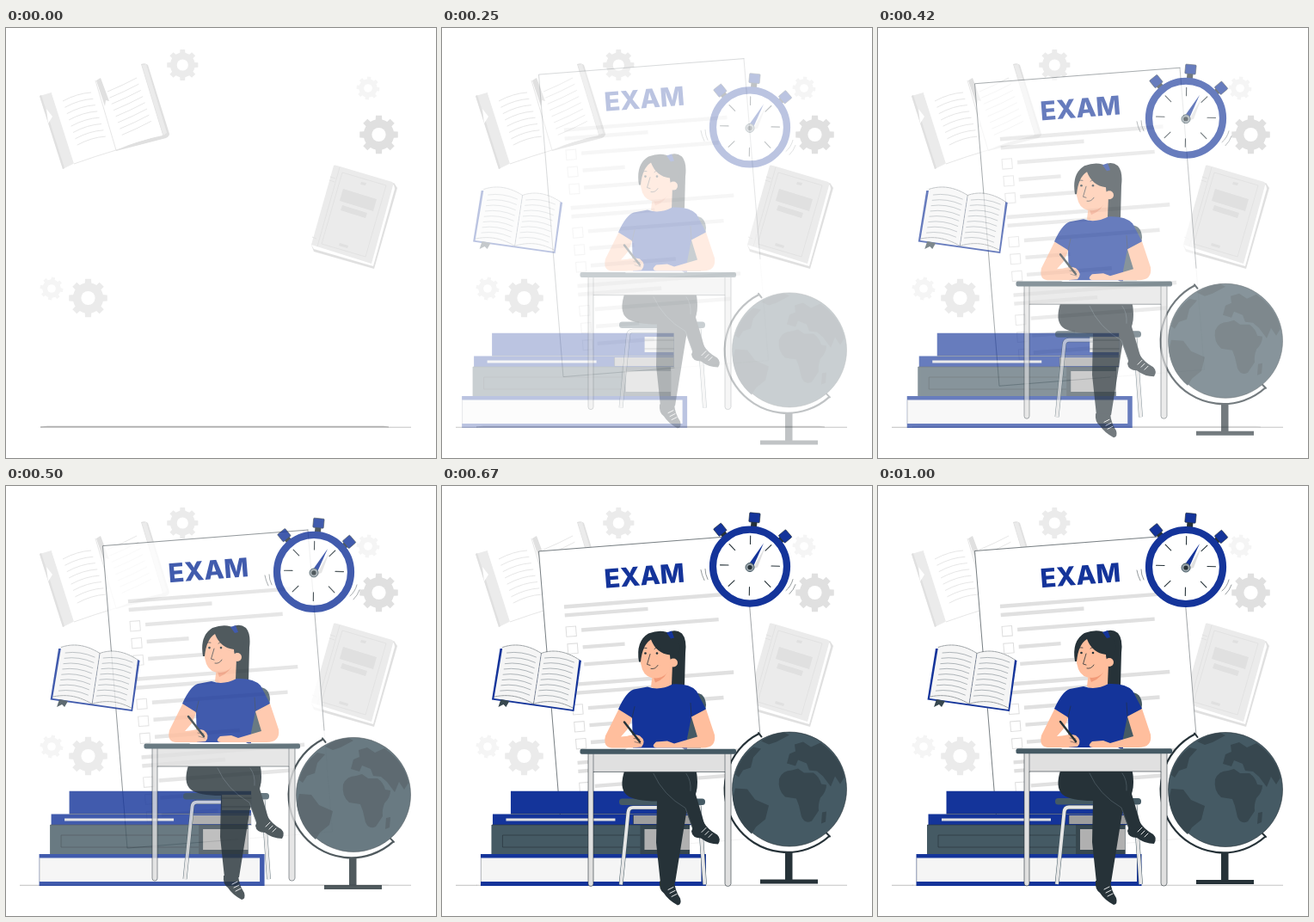
These frames come from a looping animation (500x500 px, 1.04 s). An HTML page:

```html
<!DOCTYPE html>
<html lang="en">
<head>
<meta charset="utf-8">
<title>Exam</title>
<style>
html, body { margin: 0; width: 100%; height: 100%; overflow: hidden; background: #fff; }
svg { display: block; width: 100vw; height: 100vh; }
.blue { fill: #14349a; }
.dark { fill: #263238; }
.slate { fill: #455a64; }
.deep { fill: #37474f; }
.g1 { fill: #f5f5f5; }
.g2 { fill: #ebebeb; }
.g3 { fill: #e0e0e0; }
.skin { fill: #ffbe9d; }
.white { fill: #fff; }
.line { fill: none; stroke: #263238; stroke-width: .8; stroke-linecap: round; }
.edge { stroke: #263238; stroke-width: .6; }
.faint { fill: none; stroke: #e0e0e0; stroke-width: .8; }
</style>
</head>
<body>
<svg viewBox="0 0 500 500">
  <g id="gears"></g>

  <g id="backBook">
    <path class="g2" d="M39 79L53 75L80 157L66 164Z"/>
    <path class="g3" d="M39 79L41 78L68 163L66 164Z"/>
    <path class="white" d="M47 94L54 103L49 111Z"/>
    <path class="g3" d="M157 42Q162 40 165 43L190 123Q190 126 186 128L128 143L127 140L182 124Z"/>
    <path class="g2" d="M158 43L163 42L187 122L183 125Z"/>
    <path class="white" d="M53 76Q80 58 104 61Q128 42 156 43L182 125Q155 130 128 142Q104 148 79 158Z"/>
    <path class="faint" d="M104 61L128 142M79 158Q104 149 128 142L186 127"/>
    <path class="g3" d="M105 61L110 58L120 85L116 84L115 91Z"/>
    <path id="backLines" class="faint"/>
  </g>

  <g id="closedBook">
    <path class="g3" d="M451 180L455 186L428 280L358 260L355 252Z"/>
    <path class="white" d="M355 252L451 182L452 187L427 277L358 257Z"/>
    <path class="g2" d="M381 160Q382 159 385 160L449 179Q451 180 450 183L425 274L355 252Z"/>
    <path class="faint" d="M388 162L362 254M391 168L442 183L418 266L367 251ZM377 173L383 175M376 177L382 179M356 243L361 245"/>
    <path class="g3" d="M392 187L431 199L427 213L388 201ZM391 206L420 215L418 221L389 212ZM413 179L419 180L418 183L412 182ZM388 250L398 253L397 256L387 253Z"/>
  </g>

  <path d="M40 464.3H471" stroke="#c4c4c4" stroke-width="1.1"/>
  <path id="groundTip" d="M16 464.3H41" stroke="#c4c4c4" stroke-width="1.1"/>
  <path id="groundShade" d="M40 464L48 463.2H439L445 464Z" fill="#aaa" stroke="#aaa" stroke-width=".6"/>

  <g data-slide="0 -30">
    <path class="white" d="M112.500 75.500L351 57L379.500 408L141 427Z" stroke="#e6e6e6" stroke-width=".5"/>
    <path class="line" style="stroke-width:.6" d="M351 57L112.500 75.500L141 427L270 416.700"/>
    <path class="line" style="stroke-width:.4" d="M351 57L370 290"/>
    <g id="paperRows"></g>
    <text class="blue" transform="translate(189.5 118.2) rotate(-4.43)" font-family="Inter, sans-serif" font-weight="800" font-size="30.3">EXAM</text>
  </g>

  <g data-slide="0 30">
    <g id="knobs"></g>
    <circle class="white" cx="358" cy="94" r="43" stroke="#14349a" stroke-width="8.2"/>
    <path id="ticks" class="line" style="stroke-width:1.1"/>
    <path class="g3" d="M376 71L367 95L361 97Z"/>
    <path class="blue" d="M374 67L362 94L357 91Z"/>
    <circle cx="358" cy="95" r="5" fill="#9aa5ab" stroke="#455a64" stroke-width="1"/>
    <circle class="dark" cx="358" cy="95" r="2.6"/>
    <path class="line" style="stroke-width:.5" d="M301 98Q302 104 305 110M306 97Q306 103 309 109M400 122Q406 117 408 109M404 126Q409 121 411 115"/>
  </g>

  <g data-slide="-30 0">
    <path class="blue" d="M67 189H70L159 202L161.500 203L153 262L57.500 248.500Z"/>
    <path class="g1" d="M70 187.500Q92 180 115 194.500L106 253.500L60 247Z"/>
    <path class="g1" d="M115 194.500Q136 187 159 202L151.500 260L106 253.500Z"/>
    <path class="line" style="stroke-width:.45" stroke-dasharray="3 1" d="M70 187.500Q92 180 115 194.500Q136 187 159 202M115 194.500L106 253.500M61 245Q84 240 106 253.500Q129 246 151.500 258"/>
    <path id="bookLines" class="line" style="stroke-width:.5;stroke:#66727a"/>
    <path class="deep" d="M68 248L78 250L74 257L71 254L65 257Z"/>
  </g>

  <g data-slide="-30 0">
    <path class="blue" d="M44.500 428H306.500V465H44.500Z"/>
    <path class="g1" d="M44.500 432.500H301V460H44.500Z"/>
    <path class="line" style="stroke-width:.3" d="M45 433V460"/>
    <path class="slate" d="M57 394H287.500V428H57Z"/>
    <path class="line" style="stroke-width:.6" d="M230 406H70V420H230"/>
    <path class="deep" d="M230 394H287.500V428H230Z"/>
    <path fill="#b0b0b0" d="M235 399H287.500V423H235Z"/>
    <path class="blue" d="M58.500 381.500H291V394H58.500ZM79.500 354.700H291V381H79.500Z"/>
    <path fill="#e0e0e0" d="M74 386.500H201V389.500H74Z"/>
    <path fill="#9e9e9e" d="M222 383H291V393H222Z"/>
    <path fill="#e0e0e0" d="M257 359H291V377H257Z"/>
    <path class="line" style="stroke-width:.6" d="M58 394H291M80 381.300H291M222 383V393M257 363H291M257 373H291"/>
  </g>

  <g data-slide="0 30">
    <path class="dark" d="M399 422H407.500V458H437V463H370V458H399Z"/>
    <path d="M368.500 288.500A72.900 72.900 0 1 0 450.500 407.500" fill="#fff" stroke="#263238" stroke-width="2.2"/>
    <path class="line" style="stroke-width:2" d="M368 287.500L371.500 292M447 404L451 408"/>
    <circle class="slate edge" cx="404" cy="353" r="66.500"/>
    <path class="deep" d="M392 341Q396 331 407 331L414 329L421 334L432 334Q439 339 441 347L447 348Q447 356 440 363Q437 371 438 378L430 390Q422 394 418 385L415 372L412 364L399 362Q390 354 392 341Z"/>
    <path class="deep" d="M401 323L404 312L411 309L410 301L420 298L429 304L440 299Q463 315 468 339L463 347L457 338L452 350L443 338L436 332L427 331L424 323L414 319L411 326Z"/>
    <path class="deep" d="M341 352L355 353L364 365L380 372L376 388L365 397L360 405Q341 389 338 364ZM341 336Q346 316 362 304L371 306L362 316L359 328L350 331L345 339ZM371 297Q384 288 398 287L404 290L389 298L380 301ZM442 380L447 379L446 391L441 393Z"/>
  </g>

  <g data-slide="0 -30">
    <path class="slate" d="M282 304L290 240Q306 238 307 254L301 304Z"/>
    <g fill="none" stroke-linejoin="round">
      <path stroke="#455a64" stroke-width="4.800" d="M250 373.500H222Q217 373.500 216.500 379L208 463M299 371L305.500 463"/>
      <path stroke="#e6e6e6" stroke-width="3.800" d="M250 373.500H222Q217 373.500 216.500 379L208 463M299 371L305.500 463"/>
    </g>
    <rect class="slate" x="206" y="363" width="100" height="7.500" rx="3.500"/>

    <g id="legs">
      <path class="dark" d="M213 328H292Q300 345 294 360L285 374L271 461L254 461L249 414L250 366Q224 366 215 359Q205 351 213 328Z"/>
      <path class="dark" d="M250 328H295Q299 344 295 358L305 392L292 400L283 375L250 349Z"/>
      <path class="line" style="stroke:#5b6a72;stroke-width:.6" d="M246 334Q257 359 283 374L291 396M284 334Q290 342 289 354"/>
      <path class="dark" d="M253 459L270 459Q271 470 277 479Q279 486 274 487Q263 481 258 473Q252 469 253 459ZM292 396L304 390Q309 399 320 405Q325 410 321 416Q310 416 301 409Q291 409 290 401Z"/>
      <path class="line" style="stroke:#fff;stroke-width:.9" d="M263 469L269 466M265 473L271 470M267 477L273 474M302 402L307 397M306 405L310 401M310 408L314 404"/>
    </g>

    <g id="student">
      <path class="dark" d="M261 172Q270 164 279 171Q285 178 283 194L282 231Q274 235 266 230L265 194Z"/>
      <path class="skin" d="M245 216L268 206L267 231Q256 242 243 233Z"/>
      <path fill="#f29a78" d="M246 222Q257 218 264 211Q261 223 248 228Z"/>
      <path class="skin" d="M231 184Q237 171 253 175L268 190V207Q262 222 249 223Q237 223 233 213Q228 198 231 184Z"/>
      <path class="dark" d="M229 204Q225 180 240 171Q256 165 267 172Q280 181 275 195L269 207Q265 203 265 196Q249 194 243 178Q233 184 231 204Z"/>
      <circle class="skin" cx="269" cy="205" r="5"/>
      <path class="blue" d="M261 170L267 168L270 176L266 177Z"/>
      <circle class="dark" cx="236.500" cy="194" r="1.300"/>
      <circle class="dark" cx="250" cy="194" r="1.300"/>
      <path class="line" d="M233 189Q235 187 238 188M247 189Q250 186 254 189M242 195L238.500 207L242 208M243 212Q248 213 251 208"/>
      <path class="skin" d="M206 258L223 265L216 282L208 291L229 289Q238 296 232 304H197Q187 303 190 290Z"/>
      <path class="blue" d="M239 233Q253 238 268 230Q288 229 296 238L307 259L290 268L285 293V305H222L221 269L205 259Q214 239 223 236Z"/>
      <path class="line" style="stroke-width:.6" d="M221 269L224 256M290 267L289 252"/>
      <path class="skin" d="M290 268L307 259L317 289Q319 304 303 304H250Q242 303 249 297L262 296L270 299L297 291Z"/>
      <path class="skin" d="M212 292Q222 287 230 290Q238 296 232 303L220 304Z"/>
      <path class="line" style="stroke-width:2.500" d="M212 274L230 297"/>
      <path class="line" style="stroke-width:.5" d="M224 297L231 299M223 293L230 294"/>
    </g>

    <path class="g3 edge" d="M170 308H336V462Q335.500 465 332.500 465Q329 465 329 462V332H176V462Q176 465 173 465Q170 465 170 462Z"/>
    <path class="line" style="stroke-width:.5" d="M176 332V311M329 332V311"/>
    <rect class="slate" x="160.500" y="305.300" width="181.500" height="6" rx="2"/>
    <path class="white" d="M216 304H279L282 305.800H213Z"/>
  </g>
</svg>
<script>
const byId = id => document.getElementById(id);

function gear(x, y, r, cls, turn = 0) {
  const teeth = 8, profile = [[-.2, 1], [.2, 1], [.27, .79], [.5, .79], [.73, .79]];
  const points = [];
  for (let i = 0; i < teeth; i++) {
    for (const [phase, size] of profile) {
      const a = (i + phase) * 2 * Math.PI / teeth + turn;
      points.push((x + r * size * Math.cos(a)).toFixed(2) + ',' + (y + r * size * Math.sin(a)).toFixed(2));
    }
  }
  return `<polygon class="${cls}" points="${points.join(' ')}"/><circle class="white" cx="${x}" cy="${y}" r="${r * .36}"/>`;
}

// Evenly stepped, slightly bowed text lines on a page.
function pageLines(count, x, y, stepX, stepY, dx, dy, bow) {
  let d = '';
  for (let i = 0; i < count; i++) {
    d += `M${x + i * stepX} ${y + i * stepY}q${dx / 2} ${dy / 2 + bow} ${dx} ${dy}`;
  }
  return d;
}

// One heading with three answer rows, in the tilted axes of the sheet.
function paperBlock(index, widths) {
  const bar = (x, y, w) => `<rect class="g3" x="${x}" y="${y - 2.2}" width="${w}" height="4.400"/>`;
  let out = bar(0, 0, 190) + bar(0, 10, 97);
  widths.forEach((w, i) => {
    const v = 29.5 + 20 * i;
    out += `<rect x="${.2 + i * .3}" y="${v - 6}" width="11.500" height="11.500" fill="#fff" stroke="#ddd"/>` + bar(18, v - 1, w);
  });
  return `<g transform="translate(${142 + 7.8 * index} ${140 + 90.7 * index}) rotate(-4.43)">${out}</g>`;
}

// A stopwatch button whose cap is centred at the given distance from the dial.
function knob(angle, distance, w) {
  return `<g transform="translate(358 94) rotate(${angle})">
    <rect class="dark" x="-3.500" y="${-distance}" width="7" height="${distance - 44}"/>
    <rect class="blue edge" x="${-w / 2}" y="${-distance - 5.5}" width="${w}" height="11" rx="1"/></g>`;
}

byId('gears').innerHTML =
  gear(205.3, 43, 18.3, 'g2') + gear(421, 70, 13.5, 'g1', .1) + gear(433.5, 124, 22.5, 'g3') +
  gear(53, 303, 13.5, 'g1', .15) + gear(95.5, 314, 22.5, 'g2');

byId('backLines').setAttribute('d',
  pageLines(8, 66, 85, 2.4, 7.3, 33, -10, -4) + pageLines(8, 118, 74, 2.4, 7.2, 34, -16, 1));
byId('bookLines').setAttribute('d',
  pageLines(8, 75, 194, -1.1, 6.3, 34, 5, -5) + pageLines(8, 119, 200, -1.1, 6.3, 34, 5, -5));

byId('paperRows').innerHTML =
  [[160, 49, 66], [158, 52, 99], [158, 50, 66]].map((w, i) => paperBlock(i, w)).join('');

byId('knobs').innerHTML = knob(5.5, 57, 12.5) + knob(-39, 55, 11.5) + knob(49.5, 54, 11.5);

let ticks = '';
for (let i = 0; i < 8; i++) {
  const a = i * Math.PI / 4 + .02;
  const at = r => `${358 + r * Math.cos(a)} ${93 + r * Math.sin(a)}`;
  ticks += `M${at(25)}L${at(34.5)}`;
}
byId('ticks').setAttribute('d', ticks);

// Cubic bezier (.36, -.01, .5, 1.38) with a soft overshoot.
const bezier = (s, a, b) => 3 * (1 - s) * (1 - s) * s * a + 3 * (1 - s) * s * s * b + s * s * s;
function ease(x) {
  if (x >= 1) return 1;
  let low = 0, high = 1;
  for (let i = 0; i < 30; i++) {
    const mid = (low + high) / 2;
    if (bezier(mid, .36, .5) < x) low = mid; else high = mid;
  }
  return bezier(low, -.01, 1.38);
}

const LOOP = 1040, STEP = 41.6;
const layers = [...document.querySelectorAll('[data-slide]')].map(node => ({
  node, from: node.dataset.slide.split(' ').map(Number)
}));

function render(time) {
  const step = Math.min(24, Math.floor((time % LOOP + 5) / STEP));
  const p = step < 2 ? 0 : ease(step / 24 + .032);
  const opacity = Math.max(0, Math.min(1, p));
  for (const { node, from: [dx, dy] } of layers) {
    node.setAttribute('transform', `translate(${dx * (1 - p)} ${dy * (1 - p)})`);
    node.setAttribute('opacity', opacity);
  }
  byId('groundTip').setAttribute('opacity', Math.min(1, opacity * 3));
  byId('groundShade').setAttribute('opacity', 1 - opacity);
}

const start = performance.now();
function tick() {
  render(performance.now() - start);
  requestAnimationFrame(tick);
}
tick();
</script>
</body>
</html>
```
